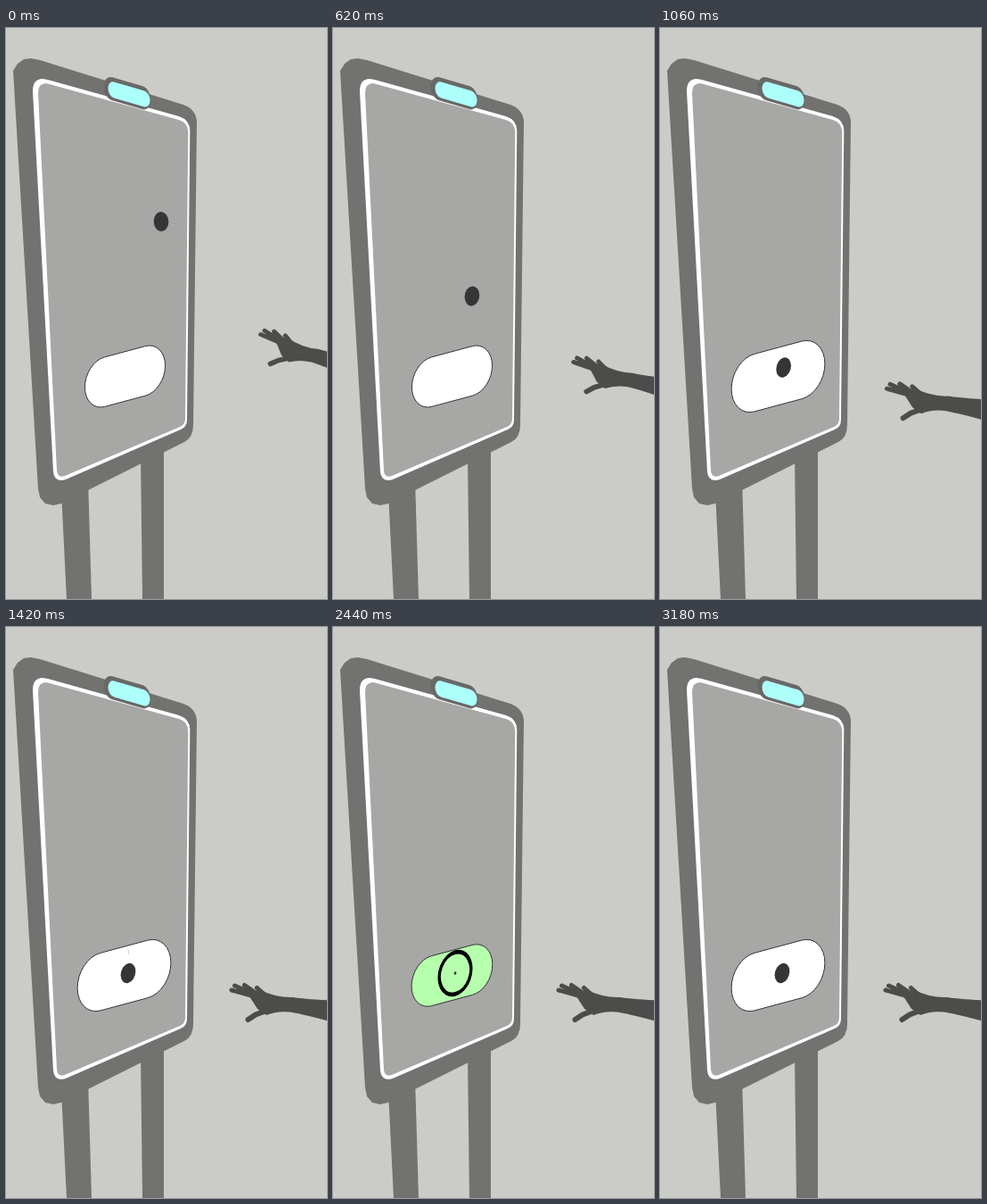
These frames come from a looping animation (360x640 px, 3220 ms). An HTML page:

```html
<!DOCTYPE html>
<html lang="en">
<head>
<meta charset="utf-8">
<title>Touchless button</title>
<style>
html, body { margin: 0; width: 100%; height: 100%; overflow: hidden; background: #cbccc7; }
svg { display: block; width: 100vw; height: 100vh; }
</style>
</head>
<body>
<svg viewBox="0 0 360 640">
  <rect width="360" height="640" fill="#cbccc7"/>
  <g fill="#727270">
    <path d="M62 520L92 505L96 640H68Z"/>
    <path d="M151 480L177 465V640H153Z"/>
    <path d="M8 48L13 40L20 35L28 34L38 36L199 86Q213 91 214 105L210 445Q210 459 200 464L62 533L53 535L44 533L38 526L36 516Z"/>
  </g>
  <path fill="#fff" d="M30 71Q30 57 41 57L47 58L194 99Q206 103 206.3 115L203 439Q203 447 196 450L67 506Q54 510 53 497Z"/>
  <path fill="#a7a7a6" d="M36 73Q36 62 45 62L49 63L194 103Q204 106 204.3 117L201 438Q201 445 194 447.5L66 502Q58 505 57 496Z"/>
  <rect id="rim" x="-35" y="-13" width="70" height="26" rx="13" fill="#686867"/>
  <rect id="lens" x="-31" y="-9" width="62" height="18" rx="9" fill="#adfffb"/>
  <rect id="pill" x="-65.5" y="-32.3" width="131" height="64.6" rx="32.3" stroke="#333" vector-effect="non-scaling-stroke"/>
  <path id="ring" d="M0-23.4A23.4 23.4 0 1 1-.01-23.4" pathLength="100" fill="none" stroke="#000" stroke-width="4.6"/>
  <circle id="dot" r="11" fill="#353535"/>
  <g id="hand" fill="#4c4c4b" stroke="#4c4c4b" stroke-linecap="round">
    <path stroke="none" d="M271 411L284 406.5Q304 416 322 415Q340 418 400 420V452Q335 434 318 431.5Q304 430 292 435L282 428Z"/>
    <path fill="none" stroke-width="5" d="M253 407L275 413M256.5 402L276 411M267.5 401.5L280 410M281.5 404.5L290 412"/>
    <path fill="none" stroke-width="6" d="M271.5 440L280 434.5L292 430"/>
  </g>
</svg>
<script>
const LOOP = 3220;
const [rim, lens, pill, ring, dot, hand] =
  ['rim', 'lens', 'pill', 'ring', 'dot', 'hand'].map(id => document.getElementById(id));

const mix = (a, b, p) => a + (b - a) * p;
const ease = (t, from, to) => {
  const x = Math.min(1, Math.max(0, (t - from) / (to - from)));
  return (1 - Math.cos(Math.PI * x)) / 2;
};

// Places a shape on the tilted panel; horizontals lean more the farther they are from eye level.
function place(el, x, y, width, scale) {
  const a = width * scale;
  const b = a * (238 - y) * 0.00176;
  el.setAttribute('transform', `matrix(${a} ${b} 0 ${scale} ${x} ${y})`);
}

// Slides the hand down while it turns and comes a little closer.
function poseHand(p) {
  const x = mix(283.5, 251, p), y = mix(344, 408, p);
  const turn = [mix(0.95, 1, p), mix(0.13, 0, p), mix(-0.2, 0, p), mix(0.93, 1, p)];
  hand.setAttribute('transform', `translate(${x} ${y}) matrix(${turn.join(' ')} 0 0) translate(-251 -408)`);
}

function draw(t) {
  const move = ease(t, 40, 1220);
  const hover = ease(t, 720, 1020);
  const load = ease(t, 1400, 2200);
  const back = ease(t, 2500, 3000);
  const press = ease(t, 2200, 2480) * (1 - back);

  const big = hover * (1 - press);
  place(pill, mix(133.5, 132.5, big), 390.5, 0.8, mix(0.86, 1, big));
  pill.setAttribute('fill', `rgb(${mix(255, 178, press)},255,${mix(255, 168, press)})`);

  place(ring, 137, 388, 0.76, 1);
  ring.setAttribute('stroke-dasharray', load < 1 ? `${load * 100} 200` : 'none');
  ring.setAttribute('opacity', load > 0 ? 1 - back : 0);

  place(dot, mix(174, 137, move), mix(217, 388, move), 0.76, 1 - 0.88 * press);
  poseHand(move);
}

place(rim, 136, 73.2, 0.76, 1);
place(lens, 138, 74.4, 0.76, 1);

const start = performance.now();
function tick() {
  draw((performance.now() - start) % LOOP);
  requestAnimationFrame(tick);
}
tick();
</script>
</body>
</html>
```
